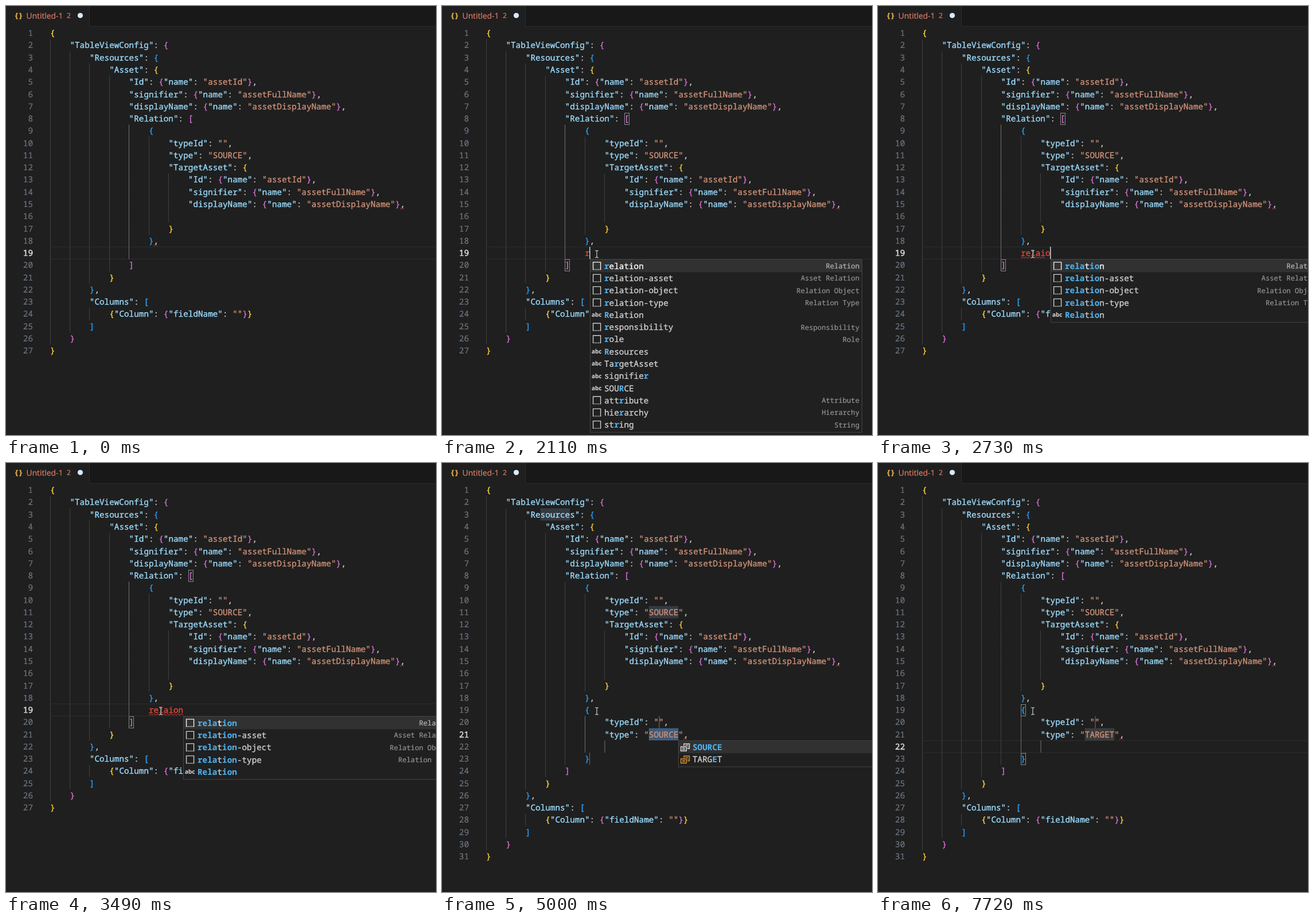
Recreate the animation shown at these times as an HTML page. Size 750 by 747 pixels, loop 8000 ms.

```html
<!DOCTYPE html>
<html lang="en">
<head>
<meta charset="utf-8">
<title>Snippet completion</title>
<style>
html, body { margin: 0; width: 100%; height: 100%; overflow: hidden; background: #1f1f1f; }
svg { display: block; width: 750px; height: 747px; }
text, tspan { fill: currentColor; stroke: currentColor; }
text { font: 14.333px "Noto Sans Mono", "DejaVu Sans Mono", monospace; text-rendering: geometricPrecision; white-space: pre; stroke-width: .35px; }
.ui { font-family: "Open Sans", "Noto Sans", sans-serif; stroke-width: .15px; }
.num { color: #6e7681; text-anchor: end; stroke-width: .2px; }
.num.on { color: #dcdcdc; stroke-width: .5px; }
.detail { font-size: 12.2px; color: #969696; text-anchor: end; stroke-width: .2px; }
.detail.on { color: #bcbcbc; }
.hit { color: #4db2f0; font-weight: 700; stroke-width: .1px; }
.abc { font-size: 10px; font-weight: 700; color: #ccc; }
</style>
</head>
<body>
<svg viewBox="0 0 750 747">
  <rect width="750" height="747" fill="#1f1f1f"/>
  <rect x="145" width="605" height="36" fill="#181818"/>
  <path d="M145.5 0V35.5H750" fill="none" stroke="#2b2b2b"/>
  <text x="14.5" y="21" style="font-size:12.5px;font-weight:700" color="#e2ad48">{}</text>
  <text class="ui" x="35.6" y="21.5" style="font-size:13.8px" color="#ea8068">Untitled-1</text>
  <text class="ui" x="106" y="21.3" style="font-size:12.2px" color="#ea8068">2</text>
  <circle cx="129.5" cy="16.5" r="4.6" fill="#d6ebff"/>
  <g id="editor"></g>
  <g id="mouse" fill="none">
    <path d="M-3-6h2l1 1 1-1h2M0-5V5M-3 6h2l1-1 1 1h2" stroke="#111" stroke-width="2.4" opacity=".5"/>
    <path d="M-3-6h2l1 1 1-1h2M0-5V5M-3 6h2l1-1 1 1h2" stroke="#e4e4e4" stroke-width="1.1"/>
  </g>
</svg>
<script>
const CW = 8.6, LH = 21.27, LEFT = 77, TOP = 36.4, LOOP = 8000;
const BRACKETS = ['#ffd23c', '#da70d6', '#2d9ff5'];
const RED = '#e5483c';
const colX = c => LEFT + c * CW;
const lineY = n => TOP + (n - 1) * LH;

// Each line starts with its indent level.
const HEAD = ['0{', '1"TableViewConfig": {', '2"Resources": {', '3"Asset": {',
  '4"Id": {"name": "assetId"},', '4"signifier": {"name": "assetFullName"},',
  '4"displayName": {"name": "assetDisplayName"},', '4"Relation": [', '5{',
  '6"typeId": "",', '6"type": "SOURCE",', '6"TargetAsset": {',
  '7"Id": {"name": "assetId"},', '7"signifier": {"name": "assetFullName"},',
  '7"displayName": {"name": "assetDisplayName"},', '7', '6}', '5},'];
const TAIL = ['4]', '3}', '2},', '2"Columns": [', '3{"Column": {"fieldName": ""}}', '2]', '1}', '0}'];
const snippet = kind => ['5{', '6"typeId": "",', `6"type": "${kind}",`, '6', '5}'];

// label, detail, icon
const ITEMS = [
  ['relation', 'Relation', 'snip'], ['relation-asset', 'Asset Relation', 'snip'],
  ['relation-object', 'Relation Object', 'snip'], ['relation-type', 'Relation Type', 'snip'],
  ['Relation', '', 'abc'], ['responsibility', 'Responsibility', 'snip'], ['role', 'Role', 'snip'],
  ['Resources', '', 'abc'], ['TargetAsset', '', 'abc'], ['signifier', '', 'abc'], ['SOURCE', '', 'abc'],
  ['attribute', 'Attribute', 'snip'], ['hierarchy', 'Hierarchy', 'snip'], ['string', 'String', 'snip']];
// The last entry replaces the typed word when matching letters.
const KINDS = [['SOURCE', '', 'enum', 'source'], ['TARGET', '', 'enum', 'e']];

const typed = (word, count, under) => ({
  word, under, caret: [19, 20 + word.length],
  popup: count && { line: 20, col: 20 + word.length, items: ITEMS.slice(0, count), key: word, pick: 0 }
});
const pick = n => ({ popup: { line: 20, col: 27, items: ITEMS.slice(0, 5), key: 'relaion', pick: n } });
const choose = n => ({ popup: { line: 22, col: 39, items: KINDS, key: '', pick: n } });
const PAIR = [[19, 20], [23, 20]];

const STEPS = [
  [0, { word: '', under: 0, active: 19, caret: null, boxes: [], popup: null, kind: '', comma: RED,
        selected: false, similar: false, error: false }],
  [1250, { caret: [19, 20] }],
  [1280, { boxes: [[8, 28], [20, 16]] }],
  [1310, { comma: '#6a6a6a' }],
  [1750, { caret: null }],
  [2050, { ...typed('r', 0, 0), comma: '' }],
  [2100, typed('r', 14, 0)],
  [2150, typed('re', 9, 1)],
  [2190, typed('re', 9, 2)],
  [2280, typed('rel', 7, 2)],
  [2320, typed('rel', 7, 3)],
  [2400, typed('rela', 5, 3)],
  [2560, typed('relai', 5, 4)],
  [2580, typed('relai', 5, 5)],
  [2730, typed('relaio', 5, 5)],
  [2750, typed('relaio', 5, 6)],
  [2930, typed('relaion', 5, 6)],
  [2950, typed('relaion', 5, 7)],
  [3420, { caret: null }],
  [3500, pick(1)],
  [3600, pick(2)],
  [3930, { kind: 'SOURCE', active: 20, caret: [20, 35], popup: null, boxes: [], under: 0 }],
  [3960, { boxes: PAIR, error: true }],
  [4370, { caret: null }],
  [4500, { active: 21, caret: [21, 39], selected: true, boxes: [], ...choose(0) }],
  [4570, { similar: true }],
  [5000, { caret: null }],
  [5100, choose(1)],
  [5510, { caret: [21, 39] }],
  [5990, { caret: null }],
  [6220, { kind: 'TARGET', active: 22, caret: [22, 24], selected: false, similar: false, popup: null }],
  [6290, { boxes: PAIR }],
  [6720, { caret: null }],
  [7230, { caret: [22, 24] }],
  [7720, { caret: null }]
];

const rect = (x, y, w, h, fill, more = '') =>
  `<rect x="${x}" y="${y}" width="${w}" height="${h}" fill="${fill}" ${more}/>`;
const text = (x, y, s, attrs) => `<text x="${x}" y="${y}" ${attrs}>${s}</text>`;
const mark = (line, col, n, fill) => rect(colX(col), lineY(line), n * CW, LH, fill);
const bar = (line, col, w, fill) => rect(Math.floor(colX(col)), lineY(line), w, LH, fill);
const bracketBox = (line, col) =>
  rect(Math.floor(colX(col) + .3) + .5, Math.ceil(lineY(line)) + .5, 8, 20, '#1d221d', 'stroke="#888"');

function squiggle(line, col, n, color = RED) {
  const x = colX(col), y = lineY(line) + 17.3;
  let d = '';
  for (let i = 0; i <= n * CW; i += 3) d += `${d ? 'L' : 'M'}${x + i} ${y + (i % 2 ? 0 : 2.6)}`;
  return `<path d="${d}" fill="none" stroke="${color}" stroke-width=".9"/>`;
}

function codeText(lines) {
  let depth = 0, out = '';
  lines.forEach((raw, i) => {
    const src = raw.slice(1), y = lineY(i + 1) + 15.8;
    for (const m of src.matchAll(/"[^"]*"|[{}[\]]|[:,]|\w+/g)) {
      const s = m[0];
      let color = '#cccccc';
      if (s[0] === '"') color = src[m.index + s.length] === ':' ? '#9cdcfe' : '#ce9178';
      else if ('{['.includes(s)) color = BRACKETS[depth++ % 3];
      else if ('}]'.includes(s)) color = BRACKETS[--depth % 3];
      else if (/\w/.test(s)) color = RED;
      out += text(colX(raw[0] * 4 + m.index), y, s, `color="${color}"`);
    }
  });
  return out;
}

function guides(lines, inserted) {
  let out = '';
  lines.forEach((raw, i) => {
    const n = i + 1;
    for (let level = 0; level < +raw[0]; level++) {
      const on = inserted ? level === 5 && n > 19 && n < 23 : level === 4 && n > 8 && n < 20;
      out += bar(n, level * 4, 1, on ? '#707070' : '#404040');
    }
  });
  return out;
}

// Indices of the matched letters; swaps the last two when the plain order fails.
function hits(label, key) {
  const find = k => {
    const found = [];
    let from = 0;
    for (const c of k) {
      const at = label.toLowerCase().indexOf(c, from);
      if (at < 0) return null;
      found.push(at);
      from = at + 1;
    }
    return found;
  };
  return find(key) || find(key.slice(0, -2) + key.slice(-1) + key.slice(-2, -1)) || [];
}

function icon(kind, x, y, on) {
  if (kind === 'abc') return text(x - 2, y + 3.5, 'abc', 'class="abc ui"');
  if (kind === 'snip') {
    const c = on ? '#f2f2f2' : '#cccccc';
    return `<g fill="none" stroke="${c}" stroke-width="1.4"><path d="M${x + .6} ${y + 6.3}v-13h13v13"/>` +
      `<path d="M${x} ${y + 6.1}h14.3" stroke-dasharray="2 1.1"/></g>`;
  }
  const c = on ? '#f2f2f2' : '#ee9d28';
  return `<g fill="none" stroke="${c}" stroke-width="1.3"><path d="M${x + 5} ${y - 2}v-4h9.5v8.5h-4"/>` +
    `<path d="M${x - .3} ${y - 1}h9.5v7.5h-9.5zM${x + 2} ${y + 1.5}h5M${x + 2} ${y + 4}h5M${x + 7.5} ${y - 3.5}h5M${x + 11} ${y - .5}h2"/></g>`;
}

function popupBox({ line, col, items, key, pick }) {
  const x = Math.round(colX(col)), y = Math.round(lineY(line)) + .5;
  let out = rect(x + .5, y, 474, items.length * LH + 3, '#202020', 'stroke="#454545"');
  items.forEach(([label, detail, kind, own], i) => {
    const top = y + .7 + i * LH, on = i === pick, found = hits(label, own || key);
    if (on) out += rect(x + 1, top, 473, LH, '#313131');
    const spans = [...label].map((c, j) => found.includes(j) ? `<tspan class="hit">${c}</tspan>` : c).join('');
    out += icon(kind, x + 5, top + 10.6, on);
    out += text(x + 25, top + 15.6, spans, `color="${on ? '#ffffff' : '#d0d0d0'}"`);
    out += text(x + 470, top + 15, detail, `class="detail${on ? ' on' : ''}"`);
  });
  return out;
}

function draw(s) {
  const lines = [...HEAD, ...(s.kind ? snippet(s.kind) : ['5' + s.word]), ...TAIL];
  let out = '';
  if (!s.selected) {
    const y = Math.round(lineY(s.active));
    out += rect(LEFT, y, 673, 1, '#2d2d2d') + rect(LEFT, y + 21, 673, 1, '#2d2d2d');
  }
  out += guides(lines, s.kind);
  if (s.kind) {
    out += mark(21, 33, 6, s.selected ? '#405c79' : '#3b3b3b');
    out += bar(20, 35, 2, '#4a4a4a') + bar(22, 24, 2, '#4a4a4a') + bar(23, 21, 1, '#6a6a6a');
  }
  if (s.similar) out += mark(3, 11, 6, '#343a41') + mark(11, 33, 6, '#343a41');
  for (const box of s.boxes) out += bracketBox(...box);
  lines.forEach((_, i) => {
    out += text(47, lineY(i + 1) + 15.8, i + 1, `class="num${i + 1 === s.active ? ' on' : ''}"`);
  });
  out += codeText(lines) + squiggle(15, 71, 1);
  if (s.comma) out += squiggle(18, 21, 1, s.comma);
  if (s.under) out += squiggle(19, 20, s.under);
  if (s.error) out += squiggle(21, 40, 1);
  if (s.caret) out += bar(...s.caret, 1.6, '#c8c8c8');
  if (s.popup) out += popupBox(s.popup);
  editor.innerHTML = out;
}

const editor = document.getElementById('editor');
const mouse = document.getElementById('mouse');
let state = {};
const STATES = STEPS.map(([, patch]) => state = { ...state, ...patch });
let shown = -1;

function frame(now) {
  const t = now % LOOP;
  const at = STEPS.findLastIndex(([start]) => start <= t);
  if (at !== shown) draw(STATES[shown = at]);
  const p = Math.min(1, Math.max(0, (t - 400) / 620));
  const k = p * p * (3 - 2 * p);
  mouse.setAttribute('transform', `translate(${696 - 426 * k} ${732 - 300 * k})`);
  mouse.setAttribute('visibility', t < 400 ? 'hidden' : 'visible');
  requestAnimationFrame(frame);
}
frame(0);
</script>
</body>
</html>
```
